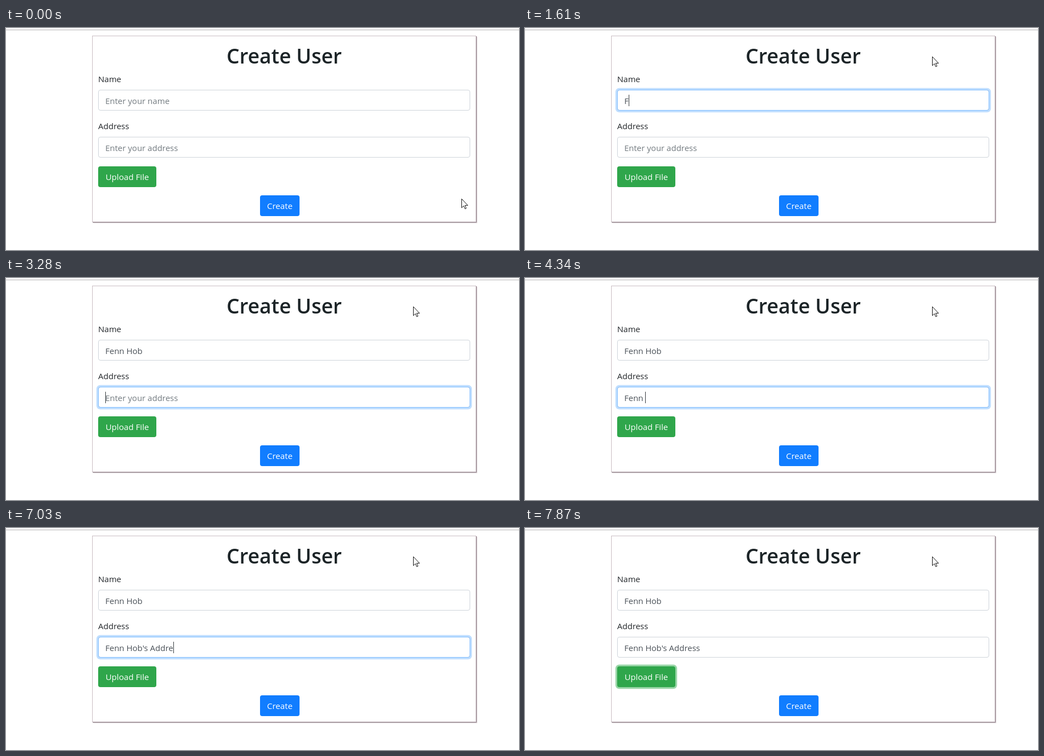
Recreate the animation shown at these times as an HTML page. Size 935 by 406 pixels, loop 8000 ms.

```html
<!DOCTYPE html>
<html lang="en">
<head>
<meta charset="utf-8">
<title>Create User</title>
<style>
  html, body { margin: 0; width: 100%; height: 100%; overflow: hidden; background: #fff; }
  svg { display: block; width: 935px; height: 406px; }
  text { font: 15px "Open Sans", "Noto Sans", sans-serif; fill: #212529; white-space: pre; }
  .title { font-size: 37.1px; font-weight: 600; fill: #1c2427; text-anchor: middle; }
  .button { font-size: 15.2px; fill: #fff; text-anchor: middle; }
  .value { fill: #495057; }
  .value.empty { fill: #737b80; }
  .box { fill: #fff; stroke: #ced4da; }
  .glow { fill: rgba(0, 123, 255, .25); }
  .edge { fill: none; stroke: #80bdff; }
  .caret { fill: #33383c; }
</style>
</head>
<body>
<svg viewBox="0 0 935 406">
  <rect y="3" width="935" height="1" fill="#b2b0b1"/>

  <g id="card">
    <path d="M159 356.5H858.5V16" fill="none" stroke="#dcd4d8"/>
    <rect x="157.5" y="14.5" width="699" height="340" fill="#fff" stroke="#c9bdc3"/>
    <path d="M158 355.5H857.5V15" fill="none" stroke="#978a91"/>
  </g>
  <text class="title" x="507" y="65">Create User</text>

  <text x="168" y="99">Name</text>
  <g id="name" transform="translate(168 113)"></g>
  <text x="168" y="185">Address</text>
  <g id="address" transform="translate(168 199)"></g>

  <rect id="uploadGlow" x="164.8" y="249.8" width="112.4" height="44.4" rx="7" fill="rgb(72,180,97)" fill-opacity=".55" opacity="0"/>
  <rect x="168" y="253" width="106" height="38" rx="4" fill="#2fa64b"/>
  <text class="button" x="221" y="278">Upload File</text>

  <rect x="463" y="306" width="72" height="38" rx="4" fill="#117dff"/>
  <text class="button" x="499" y="331">Create</text>

  <path id="pointer" d="M.5.5V16.8L4.2 13.3L6.7 18.8L8.9 17.8L6.5 12.4H11.7Z" fill="#fff" stroke="#111" stroke-width="1"/>
</svg>
<script>
const LOOP = 8000, BLINK = 530;

// Moments at which the focus glow is repainted
const PAINTS = [530, 610, 690, 3180, 3280, 7700, 7780, 7870];
const FOCUS = { name: 530, address: 3180, upload: 7700 };

// time, x, y
const POINTER = [
  [0, 830, 312], [70, 819, 274], [150, 796, 198],
  [230, 768, 108], [310, 746, 40], [400, 742, 52]
];

const PERSON = "Fenn Hob";
const fields = [
  makeField("name", "Enter your name", PERSON, FOCUS.name, FOCUS.address,
    [1610, 1810, 1980, 2150, 2350, 2620, 2790, 2860]),
  makeField("address", "Enter your address", PERSON + "'s Address", FOCUS.address, FOCUS.upload,
    [3650, 3820, 3990, 4160, 4340, 4510, 4660, 4980, 5660, 5780, 5910,
     6230, 6550, 6710, 6870, 7030, 7330, 7500])
];

const pointer = document.getElementById("pointer");
const uploadGlow = document.getElementById("uploadGlow");
const ruler = document.createElement("canvas").getContext("2d");
ruler.font = '15px "Open Sans", "Noto Sans", sans-serif';

function makeField(id, hint, text, focus, blur, keys) {
  const root = document.getElementById(id);
  root.innerHTML = `
    <rect class="glow" x="-3.2" y="-3.2" width="684.4" height="44.4" rx="7"/>
    <rect class="box" x=".5" y=".5" width="677" height="37" rx="3.5"/>
    <rect class="edge" x=".5" y=".5" width="677" height="37" rx="3.5"/>
    <text class="value" x="13" y="26"></text>
    <rect class="caret" y="9" width="1" height="21"/>`;
  const part = name => root.querySelector("." + name);
  return {
    hint, text, focus, blur, keys,
    glow: part("glow"), edge: part("edge"), value: part("value"), caret: part("caret")
  };
}

const latest = (times, t) => times.filter(x => x <= t).pop() ?? 0;

// Fade-in of the glow, held between repaints
function fade(start, t) {
  if (t < start) return 0;
  const p = Math.min(1, (latest(PAINTS, t) - start + 50) / 150);
  return p * p * (3 - 2 * p);
}

function drawField(f, t) {
  const typed = f.text.slice(0, f.keys.filter(k => k <= t).length);
  const glow = fade(f.focus, t) - fade(f.blur, t);
  f.glow.setAttribute("opacity", glow);
  f.edge.setAttribute("opacity", glow);

  f.value.textContent = typed || f.hint;
  f.value.classList.toggle("empty", !typed);

  const active = t >= f.focus && t < f.blur;
  const idle = t - Math.max(f.focus, latest(f.keys, t));
  f.caret.setAttribute("opacity", active && idle % (2 * BLINK) < BLINK ? 1 : 0);
  f.caret.setAttribute("x", 13 + Math.round(ruler.measureText(typed).width));
}

function draw(t) {
  const [, x, y] = POINTER.filter(p => p[0] <= t).pop();
  pointer.setAttribute("transform", `translate(${x} ${y})`);
  fields.forEach(f => drawField(f, t));
  uploadGlow.setAttribute("opacity", fade(FOCUS.upload, t));
}

const begin = performance.now();
function tick() {
  draw((performance.now() - begin) % LOOP);
  requestAnimationFrame(tick);
}
tick();
</script>
</body>
</html>
```
